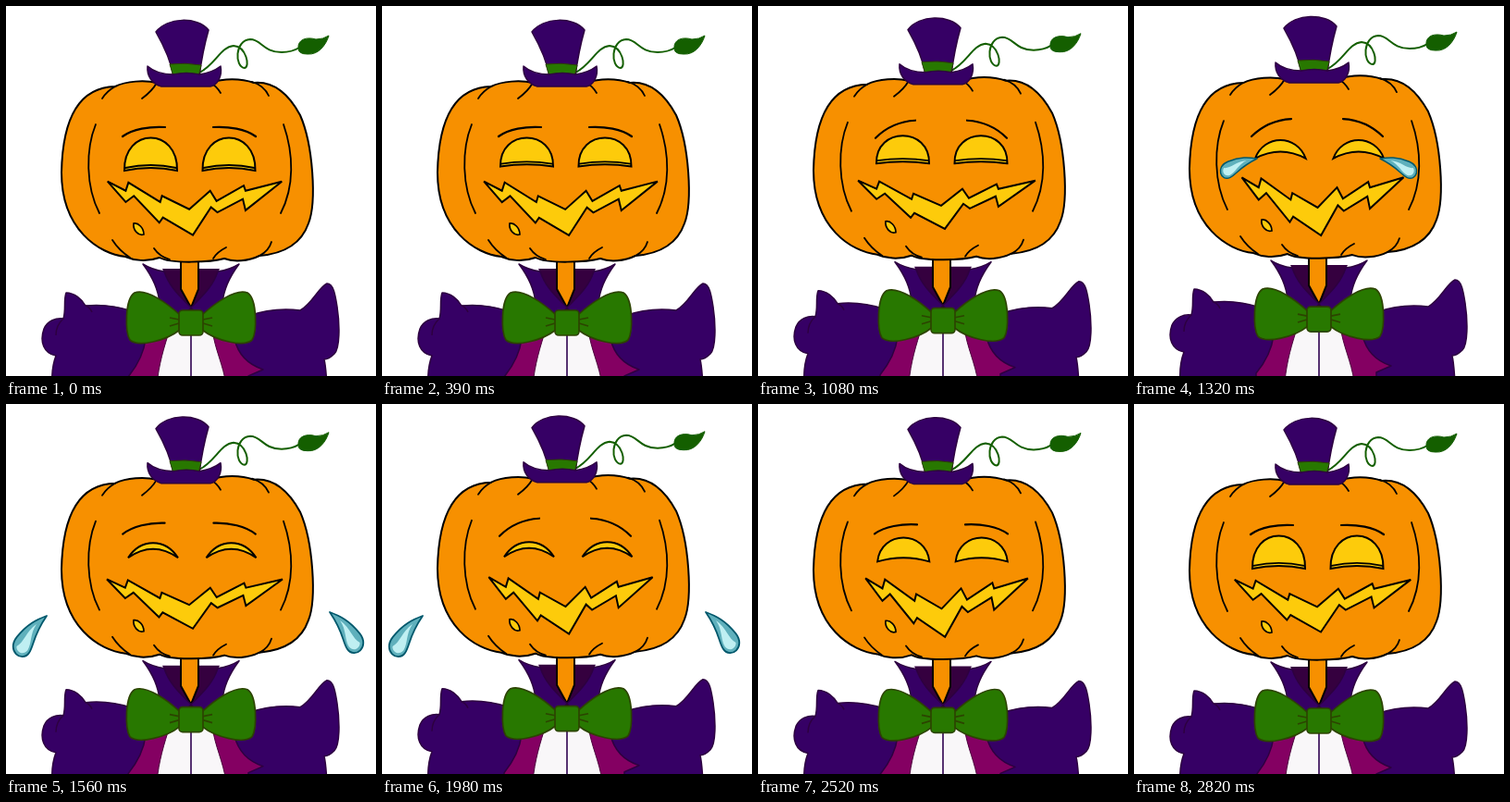
An HTML page that plays this animation: 400x400 px, repeating every 2850 ms.

```html
<!DOCTYPE html>
<html lang="en">
<head>
<meta charset="utf-8">
<title>Laughing pumpkin</title>
<style>
  html, body { margin: 0; width: 100%; height: 100%; overflow: hidden; background: #fff; }
  svg { display: block; width: 100%; height: 100%; }
  .line { fill: none; stroke: #000; stroke-width: 1.8; stroke-linecap: round; }
  .brow { stroke-width: 2.2; }
  .cloth { fill: #360065; stroke: #2d0040; stroke-width: 1.5; stroke-linejoin: round; }
  .lining { fill: #840062; stroke: #4b003c; stroke-width: 1; }
  .bow { fill: #287800; stroke: #2c4400; stroke-width: 1.7; stroke-linejoin: round; }
  .skin { fill: #f79000; stroke: #000; stroke-width: 2; }
  .glow { fill: #fdcb0b; stroke: #000; stroke-width: 2; }
  .leaf { fill: #145f00; stroke: #145f00; stroke-width: 1; }
  .open { fill: none; }
</style>
</head>
<body>
<svg viewBox="0 0 400 400">
  <defs>
    <g id="wing">
      <path class="bow" d="M188 334C175 322 152 305 139 310C128 317 129 353 134 361C143 369 173 362 188 350Z"/>
      <path class="bow open" d="M177 337L187 339M177 346L187 343"/>
    </g>
    <path id="lapel" class="cloth" d="M148 279C156 284 164 286 171 287C176 303 188 314 200 326L192 336L166 322C165 306 157 291 148 279Z"/>
    <g id="drop">
      <path fill="#5fb0bc" stroke="#00586c" stroke-width="1.8" stroke-linejoin="round" d="M0 0C10 6 20 11 38 11C57 11 57-11 43-10C33-9 27-2 0 0Z"/>
      <path fill="#bfeff2" d="M14 3C27 2 33-6 42-7C50-7 51 2 46 5C38 1 28 7 14 3Z"/>
    </g>
  </defs>

  <g id="figure">
    <path fill="#f9f7f9" d="M172 340H228L240 410H160Z"/>
    <path stroke="#2d0050" stroke-width="1.6" d="M200 350V410"/>
    <path class="lining" d="M146 350H177C171 368 165 388 163 410H128Z"/>
    <path class="lining" d="M223 350H254L282 394L262 410H238C235 388 226 372 223 350Z"/>
    <path class="cloth" d="M50 410C49 396 51 386 54 378C41 376 36 363 41 349C45 340 54 337 62 338C65 328 62 318 65 310C74 310 82 317 86 324C105 322 122 325 137 330L151 360C149 375 141 390 132 401V410Z"/>
    <path class="cloth" d="M262 335C285 327 302 327 318 329C331 322 338 304 347 300C354 300 356 312 358 325C361 345 361 370 355 376C351 380 348 382 344 382C346 391 346 398 347 410H262V400L278 393C263 388 251 377 247 360Z"/>
    <path class="cloth open" d="M86 324Q91 326 93 331M62 338Q54 345 54 356"/>
    <path fill="#35003f" d="M169 284H231L208 336H192Z"/>
    <path class="skin" d="M189 270V306L200 326L208 306V270Z"/>
    <use href="#lapel"/>
    <use href="#lapel" transform="matrix(-1 0 0 1 400 0)"/>
    <use href="#wing"/>
    <use href="#wing" transform="matrix(-1 0 0 1 400 0)"/>
    <rect class="bow" x="187" y="329" width="26" height="27" rx="4"/>

    <path class="skin" d="M60 180C61 126 77 88 118 87C130 81 150 80 163 83H221C235 78 254 78 268 83C290 81 306 96 318 118C332 150 336 212 327 235C319 258 298 268 274 270C262 276 246 277 236 273C222 277 178 279 166 272C152 277 138 275 129 271C101 268 60 242 60 180Z"/>
    <path class="line" d="M104 100Q109 92 118 87M147 100Q158 92 163 83M221 83Q228 87 232 94M266 82Q279 86 284 97M97 128C86 155 86 195 101 224M300 128C311 160 312 195 297 224M115 253Q122 264 134 272M160 262Q166 271 177 274M238 261Q228 266 224 273M287 255Q284 265 274 270"/>

    <path fill="none" stroke="#145f00" stroke-width="2" d="M209 72C226 64 232 44 246 43C260 44 264 66 258 67C247 66 247 37 264 36C276 36 278 50 298 50Q309 50 317 45"/>
    <path class="leaf" d="M316 46C315 36 325 33 335 36Q343 36 349 32C346 42 338 53 326 52Q316 52 316 46Z"/>
    <path class="cloth" d="M162 28C174 12 207 11 219 26C215 40 211 60 209 76H181C178 58 170 42 162 28Z"/>
    <path class="bow" style="stroke-width:1" d="M177 63Q194 61 211 64L208 76H181Z"/>
    <path class="cloth" d="M153 65C161 72 171 74 181 74Q195 71 209 74Q223 72 232 65C234 76 229 85 221 87H168C158 84 152 76 153 65Z"/>

    <path id="brow" class="line brow"/>
    <use href="#brow" transform="matrix(-1 0 0 1 396 0)"/>
    <g id="eye">
      <path id="eyeShape" class="glow"/>
      <path id="lid" class="line"/>
    </g>
    <use href="#eye" x="84.5"/>
    <path id="mouth" class="glow"/>
    <path class="glow" style="stroke-width:1.7" d="M138 235C143 234 149 240 149 247C143 249 137 242 138 235Z"/>
  </g>
  <use id="tearL" href="#drop"/>
  <use id="tearR" href="#drop"/>
</svg>
<script>
const LOOP = 2850, STEP = 30, TAU = Math.PI * 2;
const $ = id => document.getElementById(id);
const set = (id, name, value) => $(id).setAttribute(name, value);
const clamp = x => Math.min(1, Math.max(0, x));
const smooth = x => (x = clamp(x)) * x * (3 - 2 * x);
const ramp = (t, from, to) => smooth((t - from) / (to - from));
const mix = (a, b, k) => a + (b - a) * k;

// zigzag grin, measured from the middle of its corners
const GRIN = '-96,1 -76,10 -73,2 -38,21 -36,15 -6,28 17,10 24,20 54,5 56,10 96,1 ' +
  '56,29 53,18 25,31 18,26 -2,53 -35,36 -39,41 -67,15 -76,21';
const grin = GRIN.split(' ').map(p => p.split(',').map(Number));

// k: 0 relaxed, 1 raised
function drawBrows(k) {
  set('brow', 'd', `M${126 + k} ${141 + 4 * k}C137 ${133 + 2 * k} ${155 - 3 * k} ${130 - 3 * k} ${172 - 2 * k} ${131 - 5 * k}`);
}

// squint: 0 open, 1 lower lid raised, 2 shut to a crescent
function drawEyes(squint) {
  const raised = clamp(squint), shut = clamp(squint - 1);
  const left = 128 + 4 * shut, right = 185 + shut, mid = (left + right) / 2;
  const corner = 178 - 5.5 * raised - 5 * shut, top = 142.5 + 9 * shut;
  const low = corner - 3 + raised - 7.5 * shut;
  const inset = 15 * shut - 1, over = (4 * top - corner) / 3, under = 2 * low - corner;
  set('eyeShape', 'd', `M${left} ${corner}C${left + inset} ${over} ${right - inset} ${over} ${right} ${corner}Q${mid} ${under} ${left} ${corner}Z`);
  set('lid', 'd', `M${left + 1} ${corner - 3}Q${mid} ${under - 3} ${right - 1} ${corner - 3}`);
  set('lid', 'opacity', clamp(1 - 4 * shut));
}

// the grin pulses between wide and deep
function drawMouth(t, rest) {
  const deep = (1 - Math.cos(TAU * (t / 570 - 0.85))) / 2;
  const w = 1 - 0.09 * deep, h = 1 + 0.21 * deep + 0.07 * rest;
  const pts = grin.map(([x, y]) => `${204 + x * w} ${190 - 2 * deep - rest + y * h}`);
  set('mouth', 'd', `M${pts.join('L')}Z`);
}

// each tear swells at the eye, then flies outwards
function drawTears(t) {
  const age = t - 1155, p = age % 420 / 420;
  const shown = age >= 0 && age < 1260;
  const size = smooth(p / 0.55), fly = clamp((p - 0.61) / 0.33) ** 1.5;
  const turn = mix(158, 128.5, fly);
  const place = (id, x, y, angle, flip) => {
    set(id, 'visibility', shown ? 'visible' : 'hidden');
    set(id, 'transform', `translate(${x} ${y}) rotate(${angle}) scale(${size} ${size * flip})`);
  };
  place('tearL', mix(133, 44, fly), mix(165, 229, fly), turn, 1);
  place('tearR', mix(266, 350, fly), mix(165, 225, fly), 180 - turn, -1);
}

function draw(now) {
  const t = Math.floor(now % LOOP / STEP) * STEP;
  const bob = t > 835 && t < 2635 ? 2 - 2 * Math.cos(TAU * (t - 835) / 900) : 0;
  set('figure', 'transform', `translate(0 ${-bob})`);
  drawBrows(smooth((bob - 0.9) / 1.4));
  drawEyes(ramp(t, 0, 540) + ramp(t, 1080, 1450) - 2 * ramp(t, 2300, 2850));
  drawMouth(t, 1 - ramp(t, 540, 760) + ramp(t, 2400, 2750));
  drawTears(t);
}

const start = performance.now();
function tick() {
  draw(performance.now() - start);
  requestAnimationFrame(tick);
}
tick();
</script>
</body>
</html>
```
